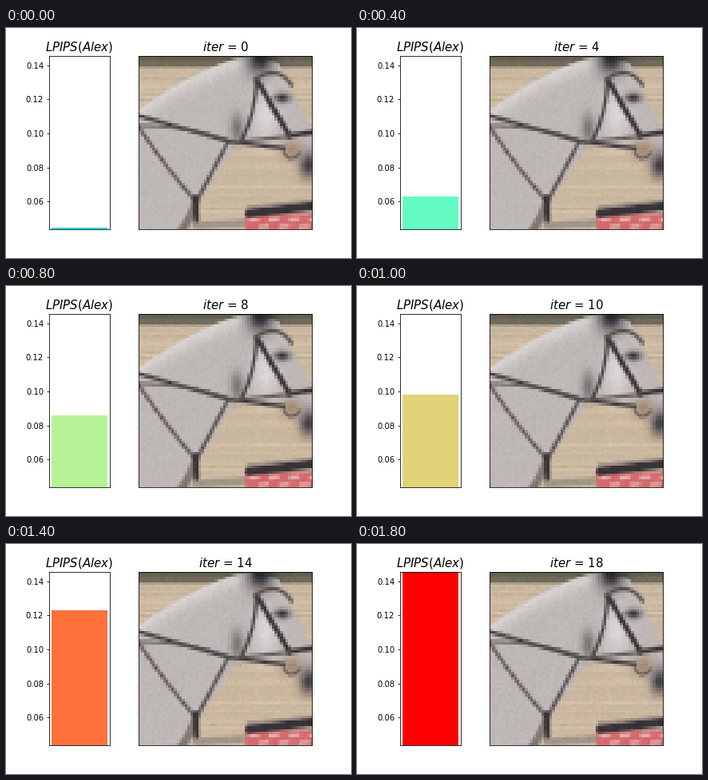
Animation, 432 px wide and 288 px high, one loop 1900 ms. Source, as a matplotlib script:

```python
import numpy as np
import matplotlib.pyplot as plt
from matplotlib.animation import FuncAnimation

FRAMES = 19
CELLS = 64
LEFT, TOP, SIDE = 165.9, 34.6, 217.4   # picture box in stage pixels
SOFT = 4                               # width of blurred edges

DARK = (60, 54, 57)
BROWN = (88, 78, 76)

# Cell centres of the picture, in stage pixels
steps = (np.arange(CELLS) + 0.5) / CELLS * SIDE
X, Y = np.meshgrid(LEFT + steps, TOP + steps)
canvas = np.empty((CELLS, CELLS, 3))
rng = np.random.default_rng(4)


def inside(distance):
    """Soft mask: 1 where distance is positive, 0 where it is negative."""
    return np.clip(distance / SOFT + 0.5, 0, 1)


def blend(mask, color):
    canvas[:] += (np.array(color) - canvas) * mask[..., None]


def glow(x, y, rx, ry, color, alpha=1.0):
    blend(alpha * np.exp(-((X - x) / rx) ** 2 - ((Y - y) / ry) ** 2), color)


def strap(start, end, width, bend=0, color=DARK):
    """Soft line from start to end, bowed sideways by bend pixels."""
    (x0, y0), (x1, y1) = start, end
    length = np.hypot(x1 - x0, y1 - y0)
    t = np.linspace(0, 1, 60)
    bow = 4 * bend * t * (1 - t) / length
    px = x0 + (x1 - x0) * t - (y1 - y0) * bow
    py = y0 + (y1 - y0) * t + (x1 - x0) * bow
    dist = np.hypot(X[..., None] - px, Y[..., None] - py).min(axis=2)
    blend(inside(width / 2 - dist), color)


def paint_ground():
    canvas[:] = (204, 185, 161)
    canvas[:] += rng.normal(0, 4, (CELLS, 1, 1))
    blend(inside(49 - Y), (112, 107, 91))
    blend(inside(40 - Y), (94, 91, 77))
    strap((238, 247), (300, 244), 9, color=(160, 149, 136))


def paint_horse():
    crest = 37 + 66 * (np.abs(305 - X) / 139) ** 1.5
    front = 290 - 0.665 * (Y - 145)
    face = 337 + 0.5 * (Y - 38)
    jaw = 146 + 41 * np.clip((X - 335) / 49, 0, 1) ** 1.3
    trunk = np.maximum(inside(front - X), inside(jaw - Y))
    horse = np.minimum(inside(Y - crest), np.minimum(inside(face - X), trunk))

    blend(horse, (190, 184, 182))
    blend(horse * np.exp(-((Y - crest) / 16) ** 2), (216, 211, 208))
    glow(325, 108, 15, 32, (224, 221, 223), 0.8)
    strap((237, 218), (219, 254), 10, bend=-2, color=(128, 119, 117))
    glow(289, 126, 8, 18, (92, 85, 86), 0.7)
    glow(318, 38, 18, 20, (38, 38, 46))
    glow(345, 88, 10, 6, (56, 51, 54))
    glow(378, 172, 11, 16, (66, 61, 68))
    glow(357, 153, 13, 12, (164, 138, 114))


def paint_tack():
    # Bridle
    strap((314, 66), (354, 135), 6.5)
    strap((313, 68), (295, 140), 4, bend=-4)
    strap((313, 64), (357, 72), 4.5, bend=-11, color=BROWN)
    strap((354, 135), (384, 131), 6)
    strap((276, 142), (347, 151), 4.5)
    strap((295, 142), (354, 136), 3.5, color=BROWN)
    strap((347, 156), (367, 157), 3, bend=7, color=BROWN)

    # Reins and breast straps
    strap((165, 110), (278, 142), 4.5)
    strap((165, 123), (278, 141), 3, bend=-5, color=BROWN)
    strap((166, 124), (238, 218), 4, bend=2, color=BROWN)
    strap((278, 142), (238, 218), 4.5, color=BROWN)
    strap((237, 212), (238, 240), 7)


def paint_wall():
    blend(np.minimum(inside(X - 299), inside(Y - 233)), (212, 106, 110))
    for row, y in enumerate((240, 249)):
        for x in range(306 + 12 * row, 384, 25):
            strap((x, y), (x + 9, y - 1), 4, color=(226, 182, 178))
    strap((304, 232), (384, 223), 11, color=(56, 51, 56))
    strap((303, 224), (384, 216), 2, color=(130, 121, 118))


def score(i):
    t = i / (FRAMES - 1)
    return 0.0444 + 0.1016 * (t - 0.345 * t * (1 - t) ** 2.5)


def picture(i):
    return np.clip(scene + ripple * i / FRAMES, 0, 255) / 255


for paint in (paint_ground, paint_horse, paint_tack, paint_wall):
    paint()
scene = canvas + rng.normal(0, 2, (CELLS, CELLS, 1))
ripple = rng.normal(0, 2, (CELLS, CELLS, 3))

plt.rcParams["font.family"] = "DejaVu Sans"
fig, (ax_bar, ax_pic) = plt.subplots(
    1, 2, figsize=(6, 4), dpi=72, gridspec_kw={"width_ratios": [1, 3]})
fig.subplots_adjust(left=0.125, right=0.9, bottom=0.125, top=0.88)

bar = ax_bar.bar([0], [score(0)], width=0.8)[0]
ax_bar.set_xlim(-0.44, 0.44)
ax_bar.set_ylim(0.04364, 0.14572)
ax_bar.set_xticks([])
ax_bar.set_yticks(np.arange(0.06, 0.15, 0.02))
ax_bar.set_title("$LPIPS(Alex)$", fontsize=15)

photo = ax_pic.imshow(picture(0), interpolation="nearest")
ax_pic.set_xticks([])
ax_pic.set_yticks([])
title = ax_pic.set_title("", fontsize=15)


def update(i):
    value = score(i)
    bar.set_height(value)
    bar.set_facecolor(plt.cm.rainbow(min(1.0, 0.018 + 6.82 * value)))
    photo.set_data(picture(i))
    title.set_text(f"$iter$ = {i}")
    return bar, photo, title


anim = FuncAnimation(fig, update, frames=FRAMES, interval=100, repeat=True)
plt.show()
```
